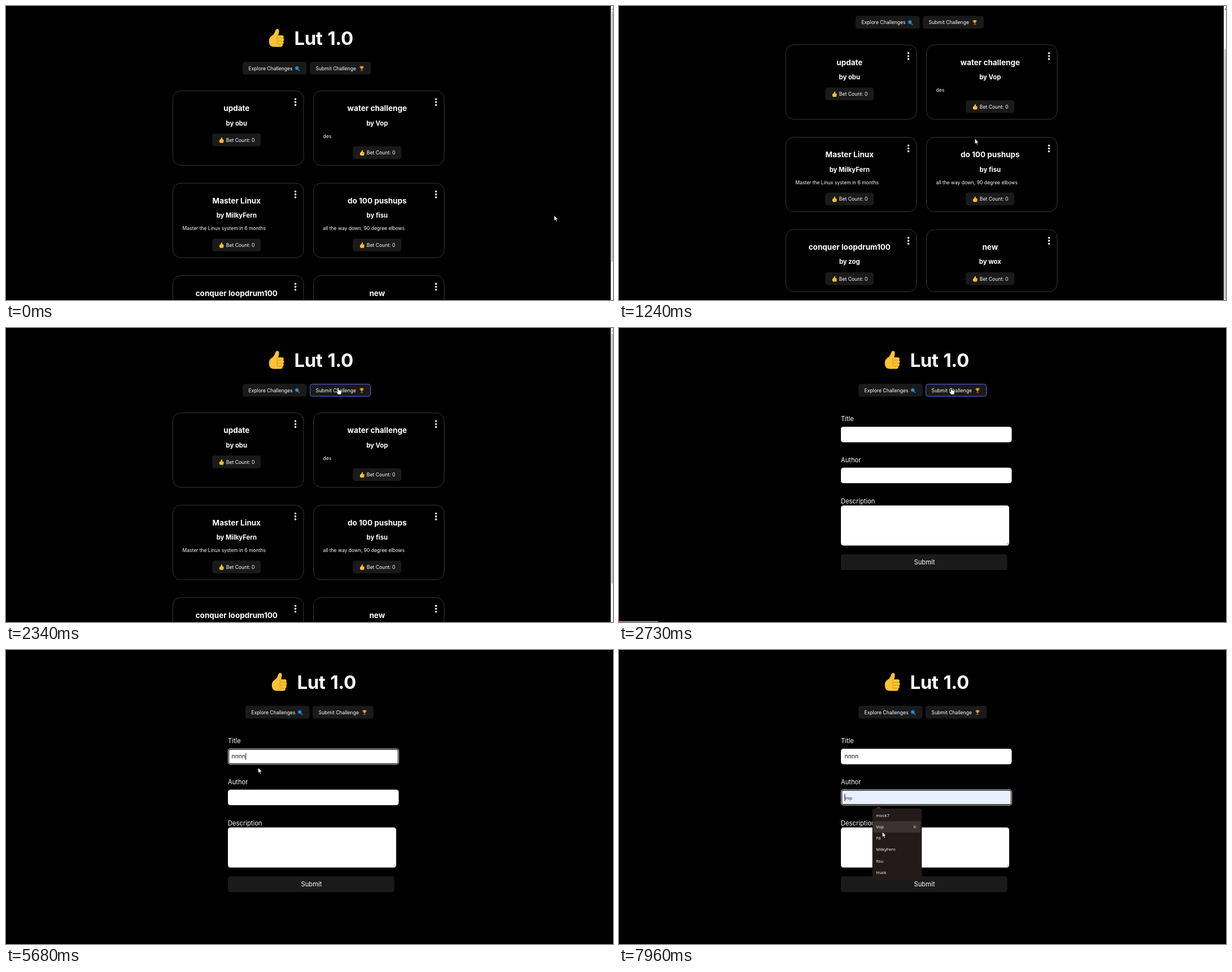
Write an HTML page that moves like this. It is 1075 px wide and 521 px high and loops after 8 s.

```html
<!DOCTYPE html>
<html lang="en">
<head>
<meta charset="utf-8">
<title>Challenges</title>
<style>
  html, body { margin: 0; width: 100%; height: 100%; overflow: hidden; background: #000; }
  svg { display: block; width: 1075px; height: 521px; }
  text { fill: #fff; font-family: Inter, "Open Sans", sans-serif; white-space: pre; }
  .h1 { font-size: 33px; font-weight: 700; letter-spacing: -.5px; word-spacing: 2px; }
  .h2 { font-size: 13.5px; font-weight: 700; }
  .h3 { font-size: 11.3px; font-weight: 700; }
  .p { font-size: 8.5px; }
  .btn { font-size: 8.6px; }
  .label { font-size: 11.2px; }
  .typed { font-size: 10.4px; fill: #111; }
  .sys { font-family: "Open Sans", "Noto Sans", sans-serif; font-size: 7.6px; }
  .dark { fill: #111; }
  .mid { text-anchor: middle; }
  .key { fill: #1a1a1a; }
</style>
</head>
<body>
<svg viewBox="0 0 1075 521" xmlns="http://www.w3.org/2000/svg">
  <defs>
    <g id="thumb">
      <path fill="#fcc433" d="M13.5 1.2C16-.5 19 1 18.6 5C18.4 8 17.6 10 17.3 12H24C27 12 27.6 15.5 26 17C28 18.5 27.8 21.5 26 22.5C27.5 24.5 26.8 27.2 24.8 27.8C25.5 30.5 24 32.5 21 32.5H10C3.5 32.5.8 28.5.8 22C.8 15.5 5 13.8 8.5 10.5C11.5 7.5 11.5 3 13.5 1.2Z"/>
      <path fill="none" stroke="#e39a1c" stroke-width="1.2" d="M17.3 12C14.5 13 14 16 16 17.2C14 18.5 14 21 16 22.4C14.3 24 14.6 26.5 16.5 27.7M16 17.2H25.5M16 22.4H25.5M16.5 27.7H24.5"/>
    </g>
    <g id="lens">
      <path stroke="#3a6f96" stroke-width="1.7" stroke-linecap="round" d="M5.6 5.8L8.2 8.4"/>
      <circle cx="3.7" cy="3.7" r="3.1" fill="#1f8fe0" stroke="#1767a5" stroke-width=".8"/>
    </g>
    <g id="cup">
      <path fill="none" stroke="#c98420" stroke-width=".8" d="M2 1.4H.5Q.5 3.8 2.6 4M6 1.4H7.5Q7.5 3.8 5.4 4"/>
      <path fill="#eda52c" d="M1.7.3H6.3Q6.4 4.8 4.5 5.2V6.6H3.5V5.2Q1.6 4.8 1.7.3Z"/>
      <path fill="#7c4a2c" d="M2.1 6.4H5.9L6.6 8.8H1.4Z"/>
    </g>
    <g id="arrow">
      <path fill="#fff" stroke="#000" stroke-width=".6" d="M0 0V9.6L2.2 7.6L3.7 11L5.2 10.3L3.7 7.1H6.7Z"/>
    </g>
    <g id="beam">
      <path fill="none" stroke="#999" stroke-width=".9" d="M-1.8-4.5Q0-4.5 0-3.6Q0-4.5 1.8-4.5M0-4V4M-1.8 4.5Q0 4.5 0 3.6Q0 4.5 1.8 4.5"/>
    </g>
    <g id="hand">
      <path fill="#fff" stroke="#000" stroke-width=".6" d="M-1 1Q0-.6 1 1V4.6L5 5.4Q6.4 5.8 6.2 7.5L5.2 12.4H-.2L-3.2 8.2Q-3.6 6.6-2.2 7L-1 8Z"/>
    </g>
  </defs>
  <g id="list"></g>
  <g id="bar"></g>
  <g id="form"></g>
  <use id="pointer"/>
</svg>
<script>
const $ = id => document.getElementById(id);
const LOOP = 8000;

const rect = (x, y, w, h, r, attrs = '') =>
  `<rect x="${x}" y="${y}" width="${w}" height="${h}" rx="${r}" ${attrs}/>`;
const text = (x, y, cls, s, attrs = '') =>
  `<text x="${x}" y="${y}" class="${cls}" ${attrs}>${s}</text>`;
const icon = (name, x, y, k = 1) =>
  `<use href="#${name}" transform="translate(${x} ${y}) scale(${k})"/>`;

const header = dx => `<g transform="translate(${dx} 0)">
  ${icon('thumb', 465, 40)}${text(510.5, 68.5, 'h1', 'Lut 1.0')}
  ${rect(419, 99, 113.5, 22.5, 4.5, 'class="key"')}
  ${text(429.5, 113.8, 'btn', 'Explore Challenges')}${icon('lens', 511.5, 106.3)}
  ${rect(538, 99, 108, 22.5, 4.5, 'class="key"')}
  ${rect(538.5, 99.5, 107, 21.5, 4, 'class="hover" fill="none" stroke="#5b62e0"')}
  ${text(548.5, 113.8, 'btn', 'Submit Challenge')}${icon('cup', 626, 106.3)}
</g>`;

const card = ([title, author, note], i) => {
  const x = i % 2 ? 544.5 : 295.5, row = i >> 1;
  const keyY = note ? 98.5 : 76;
  const dots = [15, 20.2, 25.4].map(y => `<circle cx="217" cy="${y}" r="1.8" fill="#e8e8e8"/>`).join('');
  return `<g transform="translate(${x} ${150 + row * 163.7})">
    ${rect(0, .3, 231.5, row < 2 ? 132 : 110, 14, 'fill="none" stroke="#383838"')}${dots}
    ${text(112.8, 36.2, 'h2 mid', title)}${text(112.8, 61.6, 'h3 mid', 'by ' + author)}
    ${note ? text(17, 83.6, 'p', note) : ''}
    ${rect(69.7, keyY, 86, 22.5, 4.5, 'class="key"')}
    ${icon('thumb', 82, keyY + 6.8, .3)}${text(94.3, keyY + 14.8, 'btn', 'Bet Count: 0')}
  </g>`;
};

$('list').innerHTML = header(0) + [
  ['update', 'obu'],
  ['water challenge', 'Vop', 'des'],
  ['Master Linux', 'MilkyFern', 'Master the Linux system in 6 months'],
  ['do 100 pushups', 'fisu', 'all the way down, 90 degree elbows'],
  ['conquer loopdrum100', 'zog'],
  ['new', 'wox']
].map(card).join('');

$('bar').innerHTML = rect(1071, 0, 4, 521, 0, 'fill="#f4f4f4"') +
  rect(1072, 10, 3, 443, 0, 'id="grip" fill="#c1c1c1"') +
  '<path id="up" d="M1072.5 6.5L1075 4V6.5Z"/>';

const field = (y, id) => rect(393, y, 302.5, 27.5, 4.5, 'fill="#fff"') +
  `<g id="${id}">${rect(393.5, y, 302, 27.5, 4.5, 'fill="#fff" stroke="#fff"')}
  ${rect(394.5, y + 1, 300, 25.5, 3.5, 'class="fill" fill="#fff" stroke="#101010" stroke-width="1.3"')}</g>`;

const users = ['mock7', 'Vop', 'F6', 'MilkyFern', 'fisu', 'Husk'];
const ROW = 20.25, MENU = 283;

$('form').innerHTML = header(5) +
  text(393, 165.3, 'label', 'Title') + field(175, 'ring1') +
  text(399.5, 192.4, 'typed', '', 'id="typed"') +
  text(393, 238, 'label', 'Author') + field(247.5, 'ring2') +
  text(399.8, 265, 'sys dark', '', 'id="preview"') +
  rect(399.5, 182.5, .9, 12.5, 0, 'id="caret" fill="#000"') +
  text(393, 310.6, 'label', 'Description') + rect(393, 314.5, 298, 71, 4.5, 'fill="#fff"') +
  '<path d="M685.5 384L690 379.5M688 384L690 382" stroke="#777" stroke-width=".7"/>' +
  rect(393, 401, 294.7, 28, 4.5, 'class="key"') + text(541, 418.6, 'label mid', 'Submit') +
  rect(0, 519.5, 69.5, 3, 1, 'id="status" fill="#e58673"') +
  `<g id="menu"><path fill="#3a302f" d="M455 281.5L460 277L465 281.5Z"/>
    ${rect(448.7, 281, 87.6, 126, 4, 'fill="#231a19"')}
    <g id="pick">${rect(450, MENU, 84.3, ROW, 3, 'fill="#3b3231"')}
      <path d="M521.5 291L526 295.5M526 291L521.5 295.5" stroke="#ddd" stroke-width=".9"/></g>
    ${users.map((u, i) => text(455.3, 295.7 + i * ROW, 'sys', u)).join('')}</g>`;

const ticks = [0];
for (const [a, b = a] of [[760, 1360], [1500, 2220], [2340], [2490, 2730], [3120, 3840], [3960],
  [4470], [5040], [5290], [5440, 5680], [6200], [6450, 6570], [6730], [7360, 7960]])
  for (let t = a; t <= b; t += 120) ticks.push(t);

const path = [
  [0, 970.8, 371, 'arrow'], [640, 970.8, 371, 'arrow'], [1000, 633.2, 235, 'arrow'],
  [1240, 630.2, 235, 'arrow'], [1360, 630.2, 235, 'arrow'], [1860, 689.8, 375, 'beam'],
  [1980, 660, 300, 'arrow'], [2220, 588, 127, 'arrow'], [2340, 588.3, 105.5, 'hand'],
  [3000, 588.3, 105.5, 'hand'], [3240, 520, 145, 'arrow'], [3480, 444, 189, 'beam'],
  [3840, 446, 196, 'beam'], [3960, 446.6, 208.5, 'arrow'], [6330, 446.6, 208.5, 'arrow'],
  [6570, 436.5, 264, 'beam'], [7240, 436.5, 264, 'beam'], [7480, 447, 277, 'arrow'],
  [7720, 460, 306, 'arrow'], [7960, 466.3, 322.3, 'arrow']
];
const scroll = [[0, 0], [880, 0], [1000, .7], [1240, 81.5], [1740, 82], [1860, 26.5], [1980, 4], [2100, 0]];

function at(keys, t) {
  let i = keys.length - 1;
  while (keys[i][0] > t) i--;
  const a = keys[i], b = keys[i + 1] || a;
  const k = b === a ? 0 : (t - a[0]) / (b[0] - a[0]);
  return a.slice(1).map((v, j) => typeof v === 'number' ? v + (b[j + 1] - v) * k : v);
}
const show = (el, on) => { el.style.display = on ? '' : 'none'; };
const within = (t, a, b) => t >= a && t < b;

function draw(now) {
  const t = ticks.findLast(v => v <= now);
  const onForm = t >= 2490;
  show($('list'), !onForm);
  show($('bar'), !onForm);
  show($('form'), onForm);

  const [y] = at(scroll, t);
  $('list').setAttribute('transform', `translate(0 ${-y})`);
  $('grip').setAttribute('y', 10 + y * .82);
  $('up').setAttribute('fill', y ? '#505050' : '#888');
  document.querySelectorAll('.hover').forEach(el => show(el, within(t, 2340, 3240)));

  const [px, py, kind] = at(path, t);
  $('pointer').setAttribute('href', '#' + kind);
  $('pointer').setAttribute('transform', `translate(${px} ${py})`);

  const inAuthor = t >= 6730;
  const count = [5290, 5440, 5560, 5680].filter(v => t >= v).length;
  $('typed').textContent = 'n'.repeat(count);
  show($('status'), within(t, 2490, 3360));
  show($('ring1'), within(t, 3480, 6730));
  show($('ring2'), inAuthor);
  show($('caret'), within(t, 3480, 3960) || within(t, 4470, 5040) || within(t, 5290, 6200) || inAuthor);
  $('caret').setAttribute('x', inAuthor ? 399.5 : 399.5 + count * 6.2);
  $('caret').setAttribute('y', inAuthor ? 255 : 182.5);

  const row = inAuthor ? Math.floor((py - MENU) / ROW) : -1;
  const picked = row >= 0;
  show($('menu'), inAuthor);
  show($('pick'), picked);
  $('pick').setAttribute('transform', `translate(0 ${row * ROW})`);
  $('preview').textContent = picked ? users[row] : '';
  $('ring2').querySelector('.fill').setAttribute('fill', picked ? '#e8f0fe' : '#fff');
}

const start = performance.now();
(function tick() {
  draw((performance.now() - start) % LOOP);
  requestAnimationFrame(tick);
})();
</script>
</body>
</html>
```
